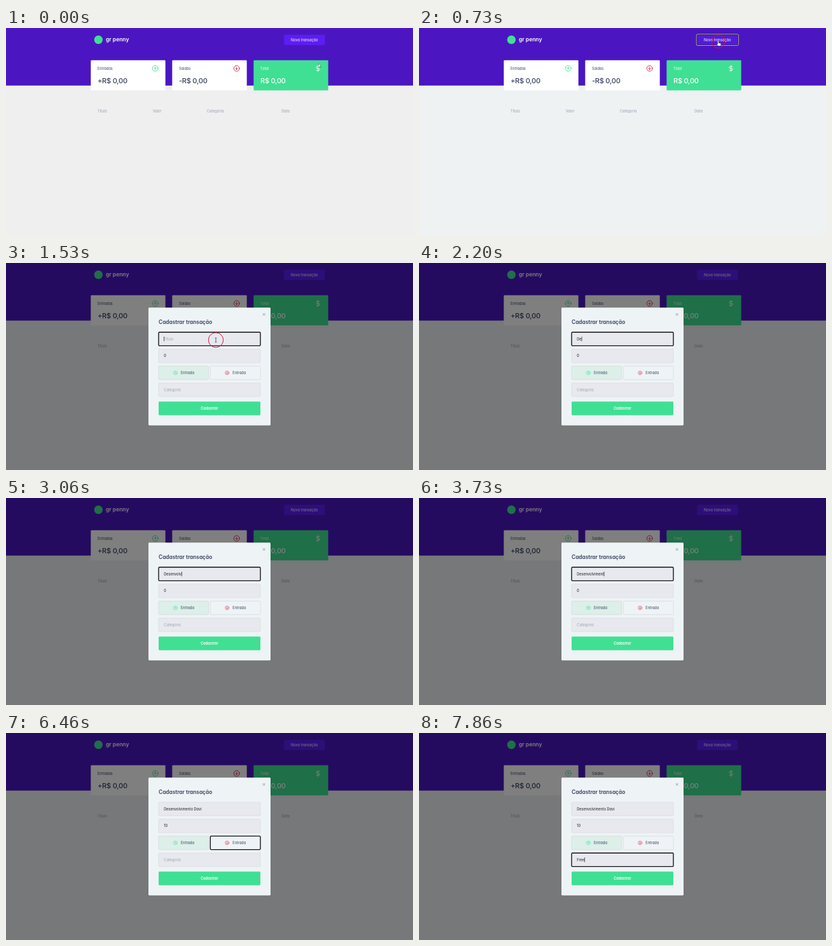
These frames come from a looping animation (640 by 326 pixels, 8000 ms). An HTML page:

```html
<!DOCTYPE html>
<html lang="pt-BR">
<head>
<meta charset="utf-8">
<title>Transações</title>
<style>
html, body { margin: 0; width: 100%; height: 100%; overflow: hidden; background: #eef2f3; }
svg { display: block; width: 100vw; height: 100vh; }
text { font: 400 16.5px Inter, "Open Sans", sans-serif; letter-spacing: .01em; font-feature-settings: "cv11"; fill: #363f5f; white-space: pre; }
.brand { font-size: 25.5px; font-weight: 600; letter-spacing: 0; }
.value { font-size: 33px; font-weight: 500; letter-spacing: -.02em; }
.title { font-size: 25px; font-weight: 600; letter-spacing: 0; }
.bold { font-weight: 600; }
.mid { text-anchor: middle; }
.white { fill: #fff; }
.muted { fill: #969cb3; }
.icon { fill: none; stroke-width: 2; stroke-linecap: round; stroke-linejoin: round; }
.ring { fill: none; stroke: #101014; stroke-width: 4; }
</style>
</head>
<body>
<svg id="stage" viewBox="0 0 1920 978" preserveAspectRatio="none"></svg>
<script>
const LOOP = 8000;
const GREEN = '#3fe094', RED = '#d81f4a';
const stage = document.getElementById('stage');

const ICONS = {
  up: '<circle cx="12" cy="12" r="10"/><path d="M16 12L12 8L8 12M12 16V8"/>',
  down: '<circle cx="12" cy="12" r="10"/><path d="M8 12L12 16L16 12M12 8V16"/>',
  dollar: '<path d="M12 1V23M17 5H9.5a3.5 3.5 0 0 0 0 7h5a3.5 3.5 0 0 1 0 7H6"/>'
};

const box = (x, y, w, h, fill, more = '') =>
  `<rect x="${x}" y="${y}" width="${w}" height="${h}" rx="4" fill="${fill}" ${more}/>`;
const label = (x, y, str, cls = '', id = '') =>
  `<text x="${x}" y="${y}" class="${cls}" ${id && `id="${id}"`}>${str}</text>`;
const icon = (name, x, y, size, color) =>
  `<g class="icon" stroke="${color}" transform="translate(${x} ${y}) scale(${size / 24}) translate(-12 -12)">${ICONS[name]}</g>`;

const card = (x, name, value, glyph, color, fill, cls) =>
  box(x, 152, 352, 143, fill) +
  label(x + 32, 198, name, cls) +
  label(x + 32, 260, value, 'value ' + cls) +
  icon(glyph, x + 304, 191, 32, color);

const field = (y, id) =>
  box(720, y, 480, 64, '#e7e9ee', 'stroke="#d7d9dd" stroke-width="2"') +
  label(745, y + 38, '', '', id);

const choice = (x, glyph, color, fill) =>
  box(x, 487, 236, 64, fill, 'stroke="#d3d8dc" stroke-width="2"') +
  icon(glyph, x + 79, 519, 21, color) +
  label(x + 105, 525, 'Entrada');

stage.innerHTML = `
  <rect id="page" width="1920" height="978"/>
  <rect width="1920" height="272" fill="#4b16c2"/>
  <circle cx="436" cy="55.5" r="20" fill="${GREEN}"/>
  ${label(471, 64, 'gr penny', 'brand white')}
  ${box(1312, 32, 192, 48, '#5d1df2', 'id="open"')}
  ${label(1408, 62, 'Nova transação', 'mid white')}
  <g id="openRing" fill="none">
    <rect x="1309" y="30" width="198" height="52" rx="5" stroke="#d9d3b8" stroke-width="3"/>
    <rect x="1311" y="32" width="194" height="48" rx="4" stroke="#101014" stroke-width="2"/>
  </g>
  ${card(400, 'Entradas', '+R$ 0,00', 'up', GREEN, '#fff', '')}
  ${card(784, 'Saídas', '-R$ 0,00', 'down', RED, '#fff', '')}
  ${card(1168, 'Total', 'R$ 0,00', 'dollar', '#fff', GREEN, 'white')}
  ${[[432, 'Título'], [692, 'Valor'], [948, 'Categoria'], [1300, 'Data']]
    .map(([x, s]) => label(x, 400, s, 'muted')).join('')}
  <g id="modal">
    <rect width="1920" height="978" fill="#000" opacity=".5"/>
    <rect id="modalGlow" x="669" y="208" width="582" height="562" rx="6" fill="#fff"/>
    ${box(672, 211, 576, 556, '#eef3f5')}
    <path id="close" d="M1211 237L1223 249M1223 237L1211 249" stroke="#8b8f9c" stroke-width="2.4"/>
    ${label(720, 287, 'Cadastrar transação', 'title')}
    ${field(327, 'name')}
    ${field(407, 'amount')}
    ${choice(720, 'up', GREEN, '#dcefe8')}
    ${choice(964, 'down', RED, '#eef3f5')}
    ${field(567, 'category')}
    ${box(720, 655, 480, 64, GREEN)}
    ${label(960, 693, 'Cadastrar', 'mid bold white')}
    <rect id="ring" class="ring" rx="4"/>
    <g id="select">
      <rect x="743" y="426" width="13" height="26" fill="#2f80dc"/>
      ${label(745, 445, '0', 'white')}
    </g>
    <path id="spin" d="M1162 435l5 -6l5 6zM1162 443l5 6l5 -6z" fill="#33363c"/>
    <rect id="caret" width="2" height="22" fill="#111"/>
  </g>
  <circle id="click" fill="none" stroke="#cf1040" stroke-width="3"/>
  <g id="mouse" stroke="#15151c" stroke-width="1.2" fill="#fff" stroke-linejoin="round">
    <path id="arrow" d="M0 0V18L4 14L7 20.5L10.5 19L7.7 13H13.5Z"/>
    <path id="hand" d="M-2.5 2a2.5 2.5 0 0 1 5 0v7l8 2q2.500 .8 2 4l-2 8h-11l-6 -8q-1 -3 2 -2.500l2 1.500z"/>
    <path id="beam" d="M-4 -10h3l1 1l1 -1h3M0 -9V9M-4 10h3l1 -1l1 1h3" fill="none" stroke-width="2"/>
  </g>`;

const el = {};
stage.querySelectorAll('[id]').forEach(n => el[n.id] = n);

// Keystroke times, one per character
const TYPING = {
  name: { y: 327, hint: 'Título', text: 'Desenvolvimento Davi',
    at: [2000, 2130, 2330, 2400, 2460, 2600, 2800, 2930, 3060, 3200, 3330, 3460, 3600, 3730, 3860,
         4130, 4330, 4460, 4600, 4860] },
  amount: { y: 407, hint: '0', text: '10', at: [5530, 5660] },
  category: { y: 567, hint: 'Categoria', text: 'Free', at: [7130, 7330, 7530, 7800] }
};

// Focus order: start, target, ring x, y, width, height
const FOCUS = [
  [800, 'modal', 672, 211, 576, 556],
  [1530, 'name', 720, 327, 480, 64],
  [5130, 'amount', 720, 407, 480, 64],
  [6130, 'income', 720, 487, 236, 64],
  [6460, 'outcome', 964, 487, 236, 64],
  [6660, 'category', 720, 567, 480, 64]
];

// Pointer stops: time, x, y
const PATH = [[0, 1474, 168], [60, 1474, 168], [600, 1412, 62], [870, 1412, 62], [1330, 990, 364], [2000, 990, 364]];
const CLICKS = [[640, 1412, 64], [1530, 990, 364]];

const clamp = v => Math.min(1, Math.max(0, v));
const ease = v => v * v * (3 - 2 * v);
const mix = (a, b, p) => a + (b - a) * p;
const show = (node, on) => node.setAttribute('visibility', on ? 'inherit' : 'hidden');
const set = (node, attrs) => { for (const k in attrs) node.setAttribute(k, attrs[k]); };

function drawMouse(t) {
  let i = 0;
  while (i < PATH.length - 2 && t >= PATH[i + 1][0]) i++;
  const [t0, x0, y0] = PATH[i], [t1, x1, y1] = PATH[i + 1];
  const p = ease(clamp((t - t0) / (t1 - t0)));
  const x = mix(x0, x1, p), y = mix(y0, y1, p);
  const onButton = t < 800 && x > 1312 && x < 1504 && y > 32 && y < 80;
  const onField = t >= 800 && x < 1200 && y > 327;
  el.mouse.setAttribute('transform', `translate(${x} ${y})`);
  show(el.mouse, t < 2000);
  show(el.hand, t < 2000 && onButton);
  show(el.beam, t < 2000 && onField);
  show(el.arrow, t < 2000 && !onButton && !onField);
  el.open.setAttribute('fill', onButton ? '#541ada' : '#5d1df2');

  const hit = CLICKS.find(c => t >= c[0] && t < c[0] + 230);
  show(el.click, hit);
  if (hit) set(el.click, { cx: hit[1], cy: hit[2], r: mix(35, 25, (t - hit[0]) / 230) });
}

function drawFields(t, focus) {
  show(el.caret, false);
  for (const id in TYPING) {
    const { y, hint, text, at } = TYPING[id];
    const count = at.filter(k => t >= k).length;
    const node = el[id];
    node.textContent = count ? text.slice(0, count) : hint;
    node.style.fill = count || id === 'amount' ? '#17181c' : '#a0a3b0';
    if (!focus || focus[1] !== id || (id === 'amount' && !count)) continue;
    const last = Math.max(focus[0], count ? at[count - 1] : 0);
    const width = count ? node.getComputedTextLength() : 0;
    set(el.caret, { x: 745 + width, y: y + 21 });
    show(el.caret, (t - last) % 1000 < 500);
  }
}

function draw(t) {
  const p = clamp((t - 60) / 400);
  const tone = [[239, 238], [239, 242], [239, 243]].map(([a, b]) => Math.round(mix(a, b, p)));
  el.page.setAttribute('fill', `rgb(${tone})`);
  show(el.openRing, t >= 660 && t < 800);
  show(el.modal, t >= 800);
  show(el.close, t >= 860);
  drawMouse(t);
  if (t < 800) return;

  const focus = FOCUS.filter(f => t >= f[0]).pop();
  const [, name, x, y, width, height] = focus;
  set(el.ring, { x, y, width, height });
  show(el.modalGlow, name === 'modal');
  show(el.spin, name === 'amount');
  show(el.select, name === 'amount' && t < 5530);
  drawFields(t, focus);
}

const start = performance.now();
function tick() {
  draw((performance.now() - start) % LOOP);
  requestAnimationFrame(tick);
}
draw(0);
requestAnimationFrame(tick);
</script>
</body>
</html>
```
